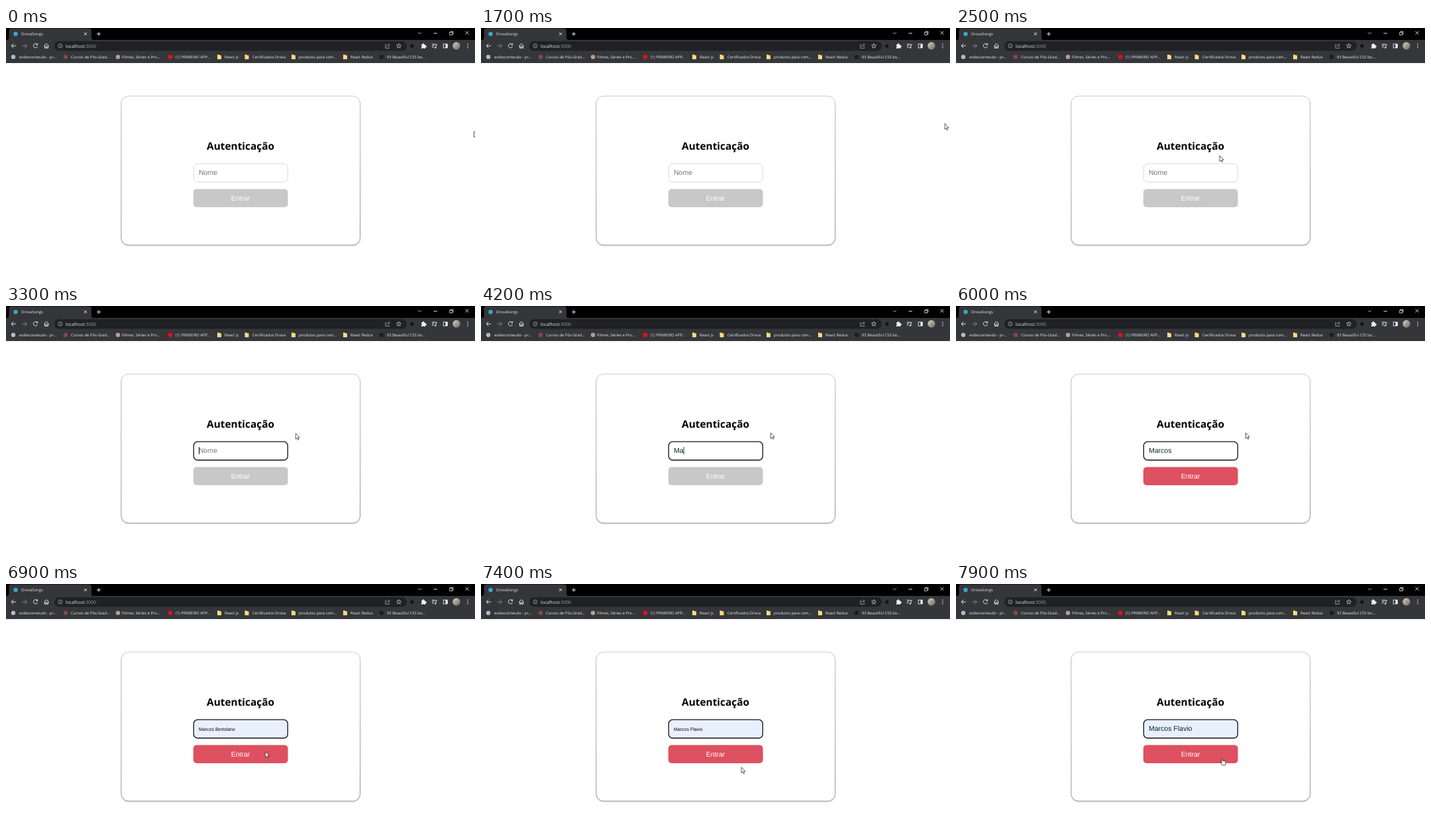
Recreate the animation shown at these times as an HTML page. Size 708 by 378 pixels, loop 8 s.

```html
<!DOCTYPE html>
<html lang="pt-BR">
<head>
<meta charset="utf-8">
<title>DrovaSongs</title>
<style>
html, body { margin: 0; width: 100%; height: 100%; overflow: hidden; background: #fff; }
svg { display: block; width: 708px; height: 378px; }
text { text-rendering: geometricPrecision; white-space: pre; }
.ui { font: 5.9px "Open Sans", "Noto Sans", sans-serif; fill: #e8eaed; }
.form { font: 10.5px "Liberation Sans", Arial, sans-serif; }
.line { fill: none; stroke: #e4e6e9; stroke-width: 1; }
</style>
</head>
<body>
<svg viewBox="0 0 708 378" xmlns="http://www.w3.org/2000/svg">
  <defs>
    <linearGradient id="edge" x1="0" y1="0" x2="0" y2="1">
      <stop offset="0" stop-color="#c2c2c2"/>
      <stop offset="1" stop-color="#8a8a8a"/>
    </linearGradient>
    <linearGradient id="photo" x1="0" y1="0" x2="1" y2="1">
      <stop offset="0" stop-color="#d8d2c8"/>
      <stop offset="1" stop-color="#6d645c"/>
    </linearGradient>
    <filter id="soft" x="-5%" y="-5%" width="110%" height="110%">
      <feGaussianBlur stdDeviation="0.8"/>
    </filter>
  </defs>

  <rect width="708" height="378" fill="#fff"/>

  <!-- Tab strip -->
  <rect width="708" height="19" fill="#000"/>
  <path d="M0 18.5Q4.500 18.5 4.500 14V4.500Q4.500 0.500 8.500 0.500H125Q129 0.500 129 4.500V14Q129 18.5 133.500 18.5Z" fill="#35363a"/>
  <circle cx="14.500" cy="9" r="3.200" fill="#35a9c4"/>
  <text class="ui" x="23" y="11.200">DrovaSongs</text>
  <g class="line">
    <path d="M118 6.800l4 4m0-4l-4 4"/>
    <path d="M137 9h6m-3-3v6"/>
    <path d="M622 6.500l2.500 2.500l2.500-2.500" stroke-width=".8"/>
    <path d="M645.500 8h5.500"/>
    <path d="M669.700 6.500h4v4h-4zM671 6.500v-1.300h4v4h-1.300" stroke-width=".8"/>
    <path d="M693.500 4.800l5 5m0-5l-5 5" stroke-width=".9"/>
  </g>

  <!-- Toolbar -->
  <rect y="18" width="708" height="35" fill="#35363a"/>
  <rect x="73" y="20" width="532" height="14.500" rx="7.250" fill="#202124"/>
  <g class="line">
    <path d="M15 27H8m3.300-3.300L8 27l3.300 3.300"/>
    <path d="M24.500 27h7m-3.300-3.300l3.300 3.300l-3.300 3.300" stroke="#85878a"/>
    <path d="M47.300 25a3.200 3.200 0 1 0 .3 3M47.700 23.300v2.300h-2.400"/>
    <path d="M57.300 27.200L61 23.700l3.700 3.500M58.500 26.500v4h1.700v-2.600h1.600v2.600h1.700v-4"/>
    <circle cx="82" cy="27" r="3.100" stroke-width=".7" stroke="#b9bcc0"/>
    <path d="M82 26.500v2.300M82 25v.8" stroke-width=".8" stroke="#b9bcc0"/>
    <path d="M574.500 25h-1.700v5.500h6v-1.800M575 28.500q.3-3 3.500-3M577 23.500l2.300 2l-2.300 2" stroke-width=".7" stroke="#b9bcc0"/>
    <path id="star" stroke-width=".7"/>
    <path d="M643 24.500h5.500M643 26.700h3.500M643 28.900h2.500M649 25v4.500M649 25.200h2"/>
    <rect x="660.200" y="24.200" width="6" height="5.800" stroke-width=".9"/>
  </g>
  <path d="M610 25.500h1.800l2.700-2.300v8l-2.700-2.300H610zM615.500 25q1.500 2 0 4.200" fill="#111214"/>
  <path d="M627 25h1.700a1.300 1.300 0 1 1 2.500 0h1.800v1.800a1.300 1.300 0 1 1 0 2.400v1.700h-2a1.200 1.200 0 0 0-2.200 0H627v-1.800a1.200 1.200 0 0 0 0-2.300z" fill="#f1f3f4"/>
  <ellipse cx="648" cy="29.700" rx="1.300" ry="1" fill="#e4e6e9"/>
  <rect x="663.500" y="24.200" width="3" height="5.800" fill="#f1f3f4"/>
  <circle cx="680" cy="27" r="5.700" fill="url(#photo)"/>
  <g fill="#e4e6e9">
    <circle cx="697" cy="24.300" r=".8"/><circle cx="697" cy="27" r=".8"/><circle cx="697" cy="29.700" r=".8"/>
  </g>
  <text class="ui" x="90" y="29.500" style="font-size:6.82px">localhost<tspan fill="#9aa0a6">:3000</tspan></text>
  <g id="marks"></g>

  <!-- Sign-in card -->
  <rect x="174" y="104" width="360.500" height="225" rx="11" fill="#777" opacity=".55" filter="url(#soft)"/>
  <rect x="174" y="103" width="360.500" height="225.200" rx="11" fill="#fff" stroke="url(#edge)" stroke-width=".8"/>
  <text x="354" y="184.300" text-anchor="middle" style="font:bold 15.4px 'Open Sans','Noto Sans',sans-serif">Autenticação</text>
  <rect id="field" x="283.300" y="205.200" width="142" height="27.800" rx="6"/>
  <text id="value" class="form" x="291" y="222.300"></text>
  <path id="caret" stroke="#000" stroke-width=".8"/>
  <rect id="button" x="282.800" y="243.500" width="142.800" height="27.500" rx="5"/>
  <text class="form" x="354" y="260.800" text-anchor="middle" fill="#fff">Entrar</text>

  <g id="pointer" stroke-linejoin="round">
    <path id="arrow" d="M0 0V8.600L2 6.800L3.300 9.800L4.700 9.200L3.400 6.300H6Z" fill="#fff" stroke="#222" stroke-width=".75"/>
    <path id="beam" d="M-1.500-5H1.500M0-5V5M-1.500 5H1.500" fill="none" stroke="#222" stroke-width=".8"/>
    <path id="hand" d="M-.8.600Q0-.4.800.600V4L4.300 4.700Q5.400 5 5.200 6.300L4.400 10.800H-.3L-2.900 7Q-3 5.800-1.900 6.200L-.8 7.200Z" fill="#fff" stroke="#222" stroke-width=".75"/>
  </g>
</svg>
<script>
const LOOP = 8000, STEP = 100;
const el = id => document.getElementById(id);

// Bookmarks: icon x, text x, label, icon colour (none = folder)
const bookmarks = [
  [11, 20, "exibeconteudo - pr...", "#a9bfcb"],
  [90, 98, "Cursos de Pós-Grad...", "#83494a"],
  [169, 175, "Filmes, Séries e Pro...", "#b79f91"],
  [248, 256, "(1) PRIMEIRO APP...", "#f00a1c"],
  [322, 330, "React js"],
  [363.5, 372, "Certificados Drova"],
  [434, 442, "produtos para com..."],
  [512, 520, "React Redux"],
  [567, 575, "93 Beautiful CSS bo...", "#1b1c1e"]
];
el("marks").innerHTML = bookmarks.map(([ix, tx, label, color]) => {
  const icon = color
    ? `<circle cx="${ix}" cy="43.700" r="3.200" fill="${color}"/>`
    : `<path d="M${ix - 3} 40.300h2.800l.8 1h2.400v6h-6z" fill="#fbdc7c"/>`;
  return `${icon}<text class="ui" x="${tx}" y="45.800">${label}</text>`;
}).join("");

const starPoints = Array.from({ length: 10 }, (_, i) => {
  const r = i % 2 ? 1.6 : 3.7, a = i * Math.PI / 5;
  return (593 + r * Math.sin(a)).toFixed(2) + " " + (27.2 - r * Math.cos(a)).toFixed(2);
});
el("star").setAttribute("d", "M" + starPoints.join("L") + "Z");

// Pointer path: time, x, y
const path = [
  [0, 706.5, 156.5], [1500, 706.5, 156.5], [1800, 697, 138.5], [1900, 697, 138.5],
  [2100, 630, 150], [2300, 480, 178], [2500, 398, 193], [2800, 386, 217.500],
  [2900, 386, 217.5], [3100, 405, 212], [3300, 437.3, 192.7], [3400, 437.3, 192.7],
  [3500, 437.3, 191.7], [6500, 437.3, 191.7], [6700, 418, 222], [6900, 391.5, 253.5],
  [7000, 391.5, 256], [7100, 391.5, 256], [7400, 393, 277], [7600, 395, 277],
  [7900, 402, 263.200]
];

// Field contents: start time, text, style
const entries = [
  [0, "Nome", "hint"], [4100, "M"], [4200, "Ma"], [4500, "Mar"], [4600, "Marco"], [4700, "Marcos"],
  [6800, "Marcos Bertolano", "preview"], [7300, "Marcos Flavio", "preview"], [7600, "Marcos Flavio", "filled"]
];
const caretOn = [[2900, 3600], [4100, 4700], [5200, 5800], [6300, 6800]];

function pointerAt(t) {
  const i = path.findIndex(p => p[0] > t);
  if (i < 0) return path[path.length - 1].slice(1);
  const [t0, x0, y0] = path[i - 1], [t1, x1, y1] = path[i];
  const k = (t - t0) / (t1 - t0);
  return [x0 + (x1 - x0) * k, y0 + (y1 - y0) * k];
}

function show(id, on) {
  el(id).setAttribute("display", on ? "inline" : "none");
}

function render(t) {
  const [, text, mode] = entries.filter(e => e[0] <= t).pop();
  const value = el("value"), field = el("field");
  const focused = t >= 2900, auto = t >= 6800;

  value.textContent = text;
  value.style.fontSize = mode === "preview" ? "7px" : "10.5px";
  value.setAttribute("fill", mode === "hint" ? "#757575" : mode === "preview" ? "#000" : "#06252b");

  field.setAttribute("fill", auto ? "#e8f0fe" : "#fff");
  field.setAttribute("stroke", focused ? "#101010" : "#d0d0d0");
  field.setAttribute("stroke-width", focused ? 1.3 : 0.8);
  el("button").setAttribute("fill", t >= 4500 ? "#df5060" : "#c8c8c8");

  const caretX = 291.5 + (mode === "hint" ? 0 : value.getComputedTextLength());
  el("caret").setAttribute("d", `M${caretX} 213V224.500`);
  show("caret", caretOn.some(([a, b]) => t >= a && t < b));

  const [x, y] = pointerAt(t);
  const inField = x > 283 && x < 425 && y > 205 && y < 233 && !auto && t < 6600;
  const onButton = t >= 7600 && y < 271;
  el("pointer").setAttribute("transform", `translate(${x} ${y})`);
  show("beam", inField);
  show("hand", onButton);
  show("arrow", !inField && !onButton);
}

function tick() {
  const t = performance.now() % LOOP;
  render(Math.floor(t / STEP) * STEP);
  requestAnimationFrame(tick);
}
tick();
</script>
</body>
</html>
```
